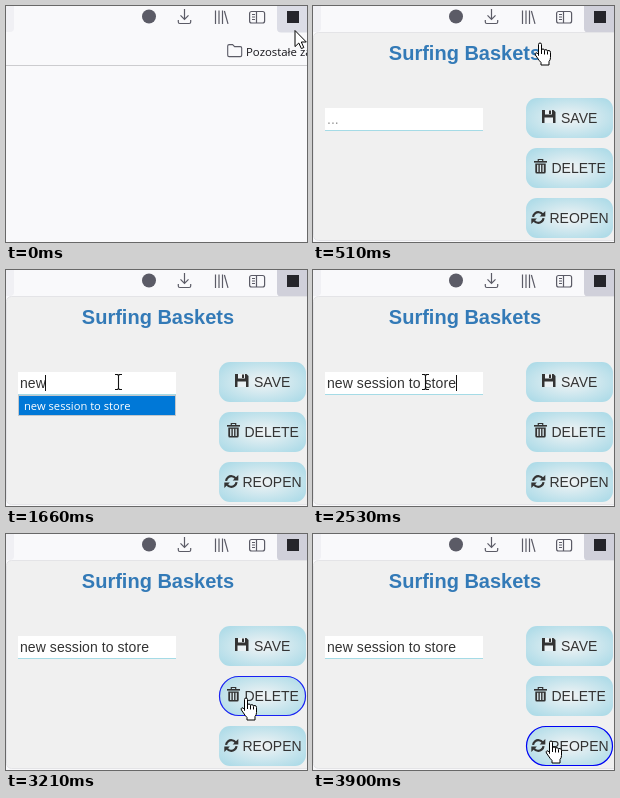
An HTML page with a canvas for the animation above (3.95 s loop, 301x236 px).

```html
<!DOCTYPE html>
<html lang="en">
<head>
<meta charset="utf-8">
<title>Popup demo</title>
<style>
html, body { margin: 0; width: 100%; height: 100%; overflow: hidden; background: #f9f9fb; }
canvas { display: block; width: 301px; height: 236px; }
</style>
</head>
<body>
<canvas id="stage"></canvas>
<script>
const W = 301, H = 236, LOOP = 3950;
const ARIAL = '"Liberation Sans", Arial, sans-serif';
const UI = '"Open Sans", "Noto Sans", sans-serif';
const PHRASE = 'new session to store';
const INK = '#333', ICON = '#5b5b66';

const canvas = document.getElementById('stage');
const dpr = window.devicePixelRatio || 1;
canvas.width = Math.round(W * dpr);
canvas.height = Math.round(H * dpr);
const c = canvas.getContext('2d');

// Pointer way points: time, x, y
const PATH = [
  [0, 289, 24], [310, 289, 24], [510, 227, 37], [650, 186, 60], [790, 140, 89],
  [920, 111, 112], [2700, 111, 112], [2980, 208.5, 149.5], [3210, 240, 164],
  [3290, 240, 164], [3400, 242.5, 182], [3490, 243.5, 199], [3640, 239.5, 206], [3760, 238, 207]
];
const CLICKS = [[40, 130], [970, 1100], [3810, 3900]];
const BUTTONS = [
  { label: 'SAVE', x: 248, y: 92, icon: floppy },
  { label: 'DELETE', x: 238.5, y: 142, icon: trash, enter: 2995, leave: 3400 },
  { label: 'REOPEN', x: 236.5, y: 192, icon: refresh, enter: 3490, leave: 9999 }
];

const clamp = v => Math.max(0, Math.min(1, v));
const ramp = (t, from, span) => clamp((t - from) / span);
const within = (t, [a, b]) => t >= a && t < b;

function pointerAt(t) {
  const i = PATH.findIndex(p => p[0] > t);
  if (i < 0) return PATH[PATH.length - 1].slice(1);
  const a = PATH[i - 1], b = PATH[i], k = (t - a[0]) / (b[0] - a[0]);
  return [a[1] + (b[1] - a[1]) * k, a[2] + (b[2] - a[2]) * k];
}

function rect(x, y, w, h, fill) {
  c.fillStyle = fill;
  c.fillRect(x, y, w, h);
}

function round(x, y, w, h, r) {
  c.beginPath();
  c.roundRect(x, y, w, h, r);
}

function stroke(d, color = ICON, width = 1.2) {
  c.strokeStyle = color;
  c.lineWidth = width;
  c.stroke(new Path2D(d));
}

function disc(x, y, r, color) {
  c.fillStyle = color;
  c.beginPath();
  c.arc(x, y, r, 0, 7);
  c.fill();
}

function text(s, x, y, font, color, align = 'left', spacing = 0) {
  c.font = font;
  c.fillStyle = color;
  c.textAlign = align;
  c.letterSpacing = spacing + 'px';
  c.fillText(s, x, y);
  c.letterSpacing = '0px';
}

function browser(t) {
  rect(0, 0, W, H, '#f9f9fb');
  c.fillStyle = '#f0f0f4';
  round(-10, -10, 18, 36, 4);
  c.fill();
  rect(0, 59, W, 1, '#cccccf');

  disc(143, 10.5, 7, ICON);
  stroke('M178.5 3V13M174.5 9.3L178.5 13.3L182.5 9.3M172.3 14V16Q172.3 17.5 173.8 17.5H183.2Q184.7 17.5 184.7 16V14');
  stroke('M209.5 4.5V18M213 4.5V18M216.5 4.5V18M218.4 5L222 17.8');
  round(243.6, 5.5, 15, 11.5, 2);
  c.strokeStyle = ICON;
  c.lineWidth = 1.2;
  c.stroke();
  stroke('M250.5 5.5V17M246 8.5H249M246 11H249M246 13.5H249');

  c.fillStyle = t < 40 ? '#dcdde6' : '#d0d0da';
  round(271, -6, 36, 32.5, 4);
  c.fill();
  rect(281, 5, 12, 12, '#25252b');

  stroke('M221.7 49.3V40Q221.7 38.6 223.1 38.6H226.6L228.6 40.6H234.3Q235.7 40.6 235.7 42V49.3Q235.7 50.6 234.3 50.6H223.1Q221.7 50.6 221.7 49.3Z', ICON, 1.1);
  text('Pozostałe za', 240, 49.5, '11.4px ' + UI, '#15141a');
}

function floppy() {
  c.fillStyle = INK;
  c.fill(new Path2D('M229 104H240.5L242.5 106V117H229Z'));
  rect(232, 104, 7, 4.5, '#eaf1f4');
  rect(236, 104.5, 2, 3.5, INK);
  rect(231.5, 111.5, 8.5, 5.5, '#eaf1f4');
}

function trash() {
  rect(221, 155, 13, 1.6, INK);
  stroke('M225.3 155V153.5H229.7V155', INK, 1.2);
  c.fillStyle = INK;
  round(222.3, 157.6, 10.4, 10, [0, 0, 1.5, 1.5]);
  c.fill();
  for (const x of [224.1, 226.8, 229.5]) rect(x, 158.8, 1.3, 7.2, '#dcecf1');
}

function refresh() {
  c.strokeStyle = INK;
  c.lineWidth = 2.2;
  for (const turn of [0, Math.PI]) {
    c.save();
    c.translate(225.3, 211.5);
    c.rotate(turn);
    c.beginPath();
    c.arc(0, 0, 5.3, Math.PI * 1.04, Math.PI * 1.8);
    c.stroke();
    c.fillStyle = INK;
    c.fill(new Path2D('M7 -6.6V-1H1.4Z'));
    c.restore();
  }
}

function button(b, t) {
  // Hovering fades in a border and rounds the corners into a pill
  const glow = b.enter ? ramp(t, b.enter, 250) * (1 - ramp(t, b.leave, 300)) : 0;
  const radius = 11 + 9 * Math.sqrt(glow);

  c.save();
  round(213, b.y, 87, 40, radius);
  c.clip();
  c.translate(256.5, b.y + 20);
  c.scale(43.5, 20);
  const g = c.createRadialGradient(0, 0, 0, 0, 0, 1.414);
  g.addColorStop(0, '#f2f4f5');
  g.addColorStop(1, '#a5d8e6');
  rect(-1, -1, 2, 2, g);
  c.restore();

  b.icon();
  text(b.label, b.x, b.y + 25, '14px ' + ARIAL, INK);

  if (glow) {
    c.strokeStyle = `rgba(0,0,245,${glow})`;
    c.lineWidth = 1.2;
    round(213.5, b.y + 0.5, 86, 39, radius);
    c.stroke();
  }
}

function typed(t) {
  if (t >= 1750) return PHRASE;
  return PHRASE.slice(0, t < 1140 ? 0 : t < 1230 ? 1 : t < 1380 ? 2 : 3);
}

function caretOn(t) {
  if (t < 1010 || t >= 3810) return false;
  return t < 2030 || Math.floor((t - 2030) / 500) % 2 === 1;
}

function field(t) {
  const s = typed(t);
  rect(12, 102, 158, 22, '#fff');
  rect(12, 124, 158, 1, '#a5dbe6');
  if (s) text(s, 14, 118, '14px ' + ARIAL, INK, 'left', 0.07);
  else text('...', 14, 118, '14px ' + ARIAL, '#999');

  if (caretOn(t)) {
    const x = s.length === 20 ? 143 : [14, 22, 30, 39][s.length];
    rect(x, 105, 1, 16, '#111');
  }
  if (within(t, [1140, 1750])) {
    const chosen = t >= 1660;
    rect(12, 125, 158, 21, '#c3c7cb');
    rect(13, 126, 156, 19, chosen ? '#0078d7' : '#fff');
    text(PHRASE, 18, 140, '11.2px ' + UI, chosen ? '#fff' : '#111');
  }
}

function popup(t) {
  if (t < 270) return;
  const k = ramp(t, 260, 140);
  c.save();
  c.globalAlpha = k;
  c.translate(0, -8 * (1 - k));
  c.fillStyle = '#f0f0f0';
  c.strokeStyle = '#e4e4e7';
  c.lineWidth = 1;
  round(0.5, 26.5, 320, 208, 5);
  c.fill();
  c.stroke();
  text('Surfing Baskets', 152, 54, 'bold 20px ' + ARIAL, '#337ab7', 'center');
  field(t);
  for (const b of BUTTONS) button(b, t);
  c.restore();
}

const ARROW = new Path2D('M.5 .5V16.6L4.3 13L6.9 18.6L9.3 17.5L6.8 12H11.8Z');
const HAND = new Path2D('M4 13V2Q4 .5 5.5 .5Q7 .5 7 2V7.5Q7 6.5 8.5 6.5Q10 6.5 10 8Q10 7.2 11.5 7.2Q13 7.2 13 8.8Q13 8 14.5 8Q16 8.2 16 10V15Q16 17.5 14.5 19V22.5H6.5V20Q4.5 18 3 15.5L.9 12.5Q.2 11 1.4 10.3Q2.6 10 4 12Z');
const HAND_LINES = new Path2D('M7 7V11.5M10 8V12M13 9V12');

function outlined(shape) {
  c.fillStyle = '#fff';
  c.strokeStyle = '#000';
  c.lineWidth = 1;
  c.fill(shape);
  c.stroke(shape);
}

function cursor(t) {
  const [x, y] = pointerAt(t);
  const over = (l, top, r, b) => t >= 300 && x >= l && x <= r && y >= top && y <= b;

  if (CLICKS.some(span => within(t, span))) {
    disc(x - 0.3, y + 0.5, 11.3, 'rgba(255,255,0,0.72)');
  }
  c.save();
  if (over(12, 102, 170, 125)) {
    c.translate(x + 1.5, y);
    stroke('M-3.5 -7.5H-1L0 -6.5L1 -7.5H3.5M0 -6.5V6.5M-3.5 7.5H-1L0 6.5L1 7.5H3.5', '#111', 1.1);
  } else if (over(74, 36, 230, 60) || BUTTONS.some(b => over(213, b.y, 300, b.y + 40))) {
    c.translate(x - 5.5, y - 0.5);
    outlined(HAND);
    c.stroke(HAND_LINES);
  } else {
    c.translate(x - 0.5, y);
    outlined(ARROW);
  }
  c.restore();
}

function draw(now) {
  const t = now % LOOP;
  c.setTransform(dpr, 0, 0, dpr, 0, 0);
  browser(t);
  popup(t);
  cursor(t);
}

let start;
function tick(now) {
  start ??= now;
  draw(now - start);
  requestAnimationFrame(tick);
}
draw(0);
requestAnimationFrame(tick);
</script>
</body>
</html>
```
